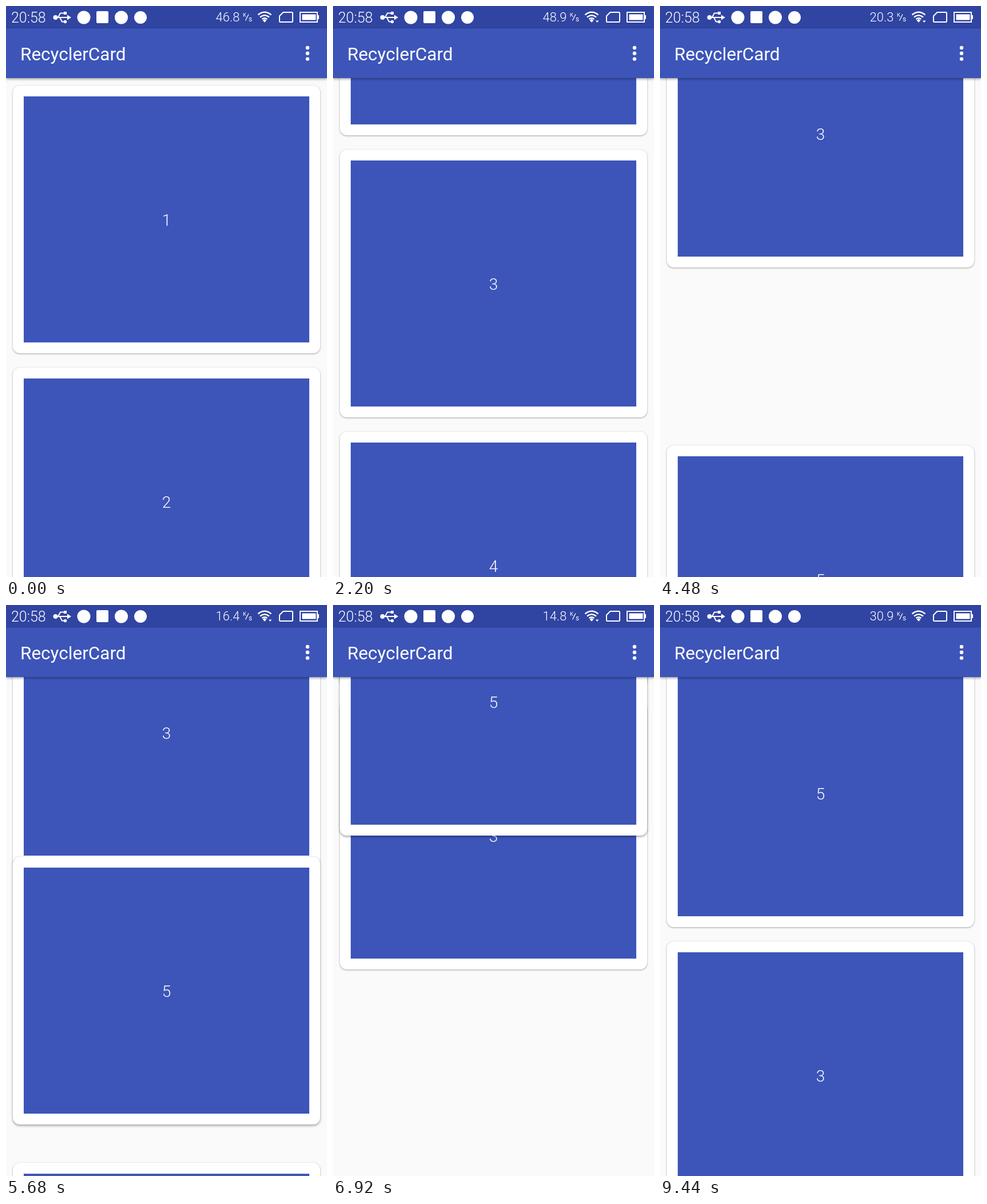
Recreate the animation shown at these times as an HTML page. Size 561 px wide and 998 px high, loop 9.48 s.

```html
<!DOCTYPE html>
<html lang="en">
<head>
<meta charset="utf-8">
<title>RecyclerCard</title>
<style>
  html, body { margin: 0; width: 100%; height: 100%; overflow: hidden; background: #fafafa; }
  body { position: relative; font-family: Roboto, sans-serif; color: #fff; }
  .card {
    position: absolute; left: 12px; top: 0; width: 537px; height: 468px;
    background: #fff; border-radius: 12px;
    box-shadow: 0 1px 3px rgba(0, 0, 0, .34), 0 0 1px rgba(0, 0, 0, .12);
  }
  .card.lifted { z-index: 1; box-shadow: 0 2px 4px rgba(0, 0, 0, .36), 0 0 2px rgba(0, 0, 0, .14); }
  .card div {
    position: absolute; left: 19px; top: 18.5px; width: 499px; height: 430.5px;
    background: #3d55b9; font-weight: 300; font-size: 28px; line-height: 433px; text-align: center;
  }
  .bar {
    position: absolute; z-index: 2; left: 0; top: 0; width: 561px; height: 126px;
    background: #3d55b9; box-shadow: 0 2px 4px rgba(0, 0, 0, .34);
  }
  svg { display: block; width: 561px; height: 126px; }
  text { fill: #fff; font-family: Roboto, sans-serif; font-weight: 300; }
</style>
</head>
<body>
<main id="list"></main>
<header class="bar">
  <svg viewBox="0 0 561 126" fill="none" stroke="#fff" stroke-width="2">
    <path d="M0 0H561V39H0Z" fill="#3044a1" stroke="none"/>
    <path d="M0 38.5H561" stroke="#2a3c91" stroke-width="1"/>
    <g fill="#fff" stroke="none">
      <text x="9" y="28.5" font-size="25">20:58</text>
      <text x="25" y="95" font-size="31.5" style="font-weight:400">RecyclerCard</text>
      <text id="speed" x="366.500" y="27" font-size="22"></text>
      <text x="414" y="19" font-size="9.500" style="font-weight:400">K</text>
      <text x="424" y="27" font-size="12" style="font-weight:400">s</text>
      <circle cx="136" cy="20" r="11.500"/>
      <rect x="158" y="9" width="21" height="21" rx="2"/>
      <circle cx="201.500" cy="20" r="11.500"/>
      <circle cx="235" cy="20" r="11"/>
      <circle cx="527" cy="73" r="3.200"/>
      <circle cx="527" cy="82.800" r="3.200"/>
      <circle cx="527" cy="92.600" r="3.200"/>
      <circle cx="86.500" cy="20" r="4"/>
      <path d="M107 15.500L114 20L107 24.500ZM101 10H106V15H101Z"/>
      <circle cx="103.500" cy="27.500" r="2.700"/>
      <path d="M517.500 14.500H541.500V24.500H517.500ZM544 16H547V23H544Z"/>
      <path d="M448.500 25L452 22.800L455.500 25L452 28.800Z"/>
      <path id="arrow" d="M459 25.500H464.500L461.700 29Z"/>
    </g>
    <path d="M86 20H109M91 20L95 12.500H102M94 20L98 27.500H103"/>
    <path d="M418.500 25.500L424 14.500" stroke-width="1.200"/>
    <path d="M440.500 15.500Q452 6 463.500 15.500M444 19.500Q452 13 460 19.500M447.500 23Q452 19.500 456.500 23" stroke-width="2.500"/>
    <path d="M484.500 11H499.500Q501 11 501 12.500V26.500Q501 28 499.500 28H479.500Q478 28 478 26.500V17.500Z"/>
    <path d="M514 11H544V28H514Z"/>
  </svg>
</header>
<script>
const LOOP = 9480, STEP = 40, PITCH = 493, TOP = 139;
const ease = {
  lin: u => u,
  in: u => u * u,
  out: u => 1 - (1 - u) ** 3,
  io: u => (1 - Math.cos(Math.PI * u)) / 2
};

// Keys are [time, value, easing towards this key].
function at(keys, t) {
  const i = keys.findIndex(k => k[0] > t);
  if (i === 0) return keys[0][1];
  if (i < 0) return keys[keys.length - 1][1];
  const [t0, a] = keys[i - 1], [t1, b, e = 'lin'] = keys[i];
  return a + (b - a) * ease[e]((t - t0) / (t1 - t0));
}
const held = (keys, t) => keys.filter(k => k[0] <= t).pop()[1];

const scroll = [
  [0, 0], [740, -230, 'io'],
  [2040, -230], [2200, -381], [3280, -643, 'out'],
  [6340, -643], [6920, -463, 'in'],
  [7400, -463], [7900, -585, 'io'], [9340, -537, 'out']
];
const close1 = [1500, 2060], close2 = [4220, 4800], swap = [6920, 7400];
const shift = (span, from, to) => [[span[0], from, 'lin'], [span[1], to, 'io']];

// Row of each card in the list, and sideways swipes.
const rows = [
  [[0, 0]],
  [[0, 1]],
  [...shift(close1, 2, 1), ...shift(swap, 1, 2)],
  shift(close1, 3, 2),
  [...shift(close1, 4, 3), ...shift(close2, 3, 2), [6900, 2], [6901, 1]],
  [...shift(close1, 5, 4), ...shift(close2, 4, 3)]
];
const swipes = {
  1: [[740, 0], [880, -159, 'in'], [960, -324], [1080, -580]],
  3: [[3400, 0], [3440, 64], [3520, 165], [3640, 370], [3760, 575]]
};
const DRAGGED = 4;
const drag = [[5480, 482], [5680, 440, 'in'], [6920, -65], [7100, -55], [7400, 169, 'io']];

const speeds = [
  [0, '46.8'], [80, '48.9'], [2240, '35.2'], [3240, '24.7'], [4240, '20.3'],
  [5200, '16.4'], [6240, '14.8'], [8400, '22.6'], [9400, '30.9']
];
const arrows = [[0, 0], [80, 1], [3240, 0], [4240, 1], [7800, 0]];

const list = document.getElementById('list');
const speed = document.getElementById('speed');
const arrow = document.getElementById('arrow');
const cards = rows.map((_, i) => {
  const card = document.createElement('section');
  card.className = 'card';
  card.innerHTML = `<div>${i + 1}</div>`;
  return list.appendChild(card);
});

function draw(t) {
  const offset = at(scroll, t);
  const lifted = t > 5480 && t <= 7400;
  cards.forEach((card, i) => {
    const x = swipes[i] ? at(swipes[i], t) : 0;
    const y = lifted && i === DRAGGED ? at(drag, t) : TOP + PITCH * at(rows[i], t) + offset;
    card.style.transform = `translate(${Math.round(x)}px, ${Math.round(y)}px)`;
  });
  cards[DRAGGED].classList.toggle('lifted', lifted);
  speed.textContent = held(speeds, t);
  arrow.style.opacity = held(arrows, t);
}

const start = performance.now();
function tick() {
  const t = (performance.now() - start) % LOOP;
  draw(Math.floor(t / STEP) * STEP);
  requestAnimationFrame(tick);
}
tick();
</script>
</body>
</html>
```
